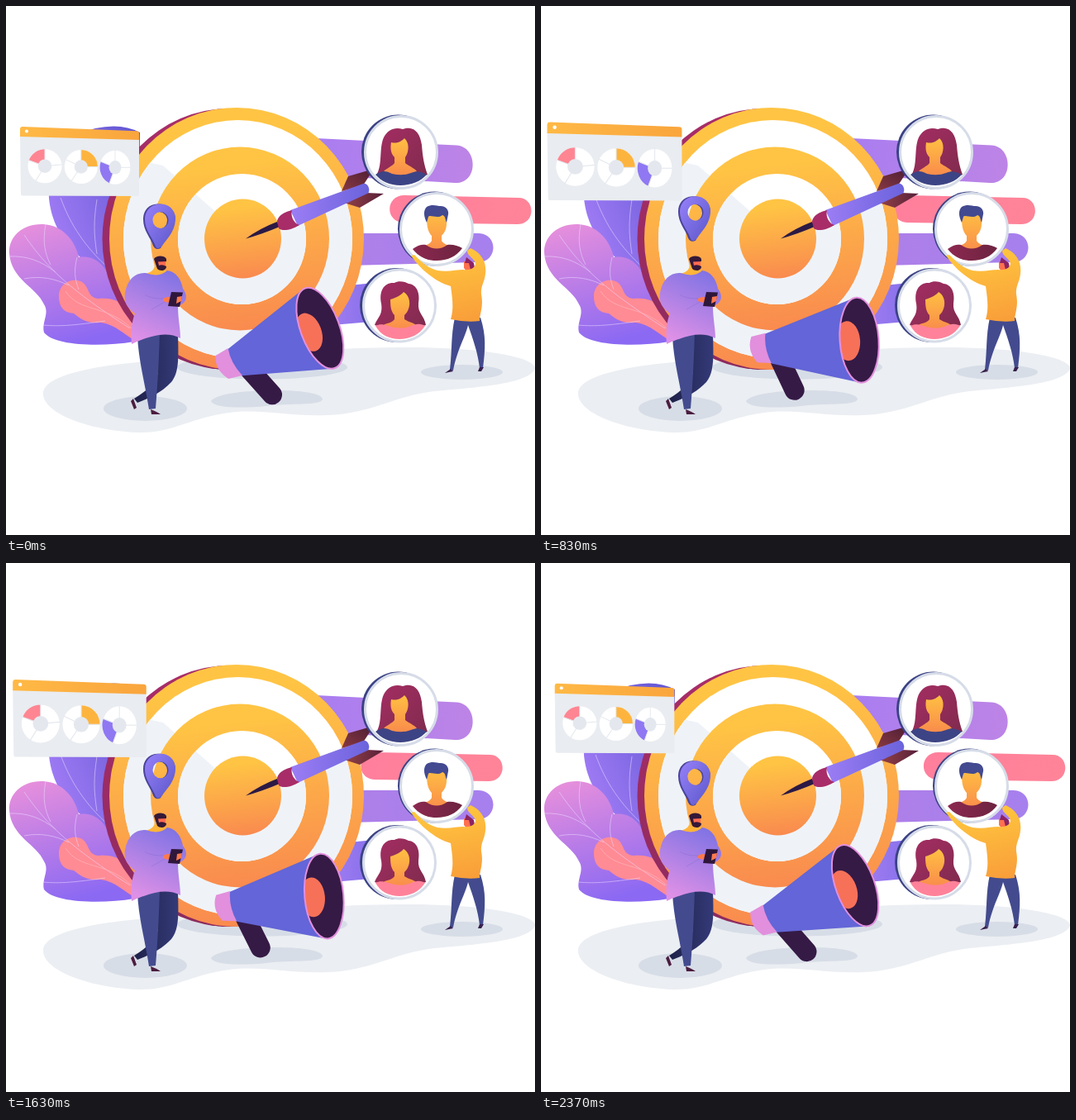
These frames come from a looping animation (640 by 640 pixels, 2.4 s). An HTML page:

```html
<!DOCTYPE html>
<html lang="en">
<head>
<meta charset="utf-8">
<title>Target audience</title>
<style>
  html, body { margin: 0; width: 100%; height: 100%; overflow: hidden; background: #fff; }
  svg { display: block; width: 100%; height: 100%; }
</style>
</head>
<body>
<svg viewBox="0 0 640 640">
  <defs id="defs"></defs>

  <!-- ground -->
  <path fill="#ebeef2" d="M45 468C47 446 110 433 200 428C300 420 420 412 500 413C580 414 640 425 640 438C636 456 575 461 530 465C470 469 450 492 390 495C340 497 310 487 270 492C225 498 200 517 160 516C100 514 43 492 45 468Z"/>
  <g fill="#d7dde7">
    <ellipse cx="310" cy="437" rx="103" ry="14.5"/>
    <ellipse cx="168.500" cy="487" rx="50.500" ry="15"/>
    <path d="M248 478C254 469 290 465 325 465C355 465 383 468 383 476C380 484 345 480 315 484C285 487 250 486 248 478Z"/>
    <ellipse cx="551.500" cy="443" rx="49.500" ry="9"/>
  </g>

  <!-- leaves -->
  <path fill="url(#leafBack)" d="M162 153Q140 141 108 148C66 160 50 195 52 233C55 262 68 285 92 306L125 385H160Z"/>
  <path fill="url(#leaf)" d="M4 299C3 279 20 263 45 264C68 265 84 284 88 304C105 301 120 312 124 328C128 342 140 352 155 362V406C115 413 58 411 46 395C43 382 53 372 46 361C37 340 6 331 4 299Z"/>
  <path fill="#ff8b95" d="M64 352C63 338 77 328 90 333C102 338 97 353 112 354C130 352 142 358 158 374V406C145 399 132 385 115 383C98 384 92 380 82 372C70 371 64 364 64 352Z"/>
  <g fill="none" stroke="#eadcff" stroke-width=".9" opacity=".6">
    <path d="M22 277C50 318 80 345 150 390M48 264C44 285 47 300 54 313M4 303C25 302 42 308 60 322M86 304C82 320 83 330 88 343M45 386C65 388 85 386 120 381M22 330C42 326 60 330 76 338"/>
    <path d="M66 232C78 265 96 292 125 318M110 234C106 260 106 275 110 300"/>
    <path stroke="#ffc3c3" d="M72 345C90 372 120 360 152 390"/>
  </g>

  <!-- bars -->
  <path fill="url(#bar1)" d="M375 160L545 168.500C571 170 572 215 543 214L400 206Z"/>
  <path fill="url(#bar2)" d="M415 275L572 275C596 276 595 310 571 310L415 314Z"/>
  <path fill="url(#bar3)" d="M415 338L465 333V380L395 386Z"/>
  <path id="slider" fill="url(#barPink)" d="M482 229L620 232C641 232 641 264 619 264L481 262C458 261 459 229 482 229Z"/>

  <!-- target -->
  <ellipse cx="270" cy="282" rx="153.500" ry="158" fill="url(#rim)"/>
  <ellipse cx="279" cy="281.500" rx="154" ry="158.500" fill="url(#gold)"/>
  <g id="rings"></g>
  <ellipse cx="286.500" cy="281.500" rx="46.500" ry="48" fill="url(#gold)"/>

  <!-- dart -->
  <path fill="url(#finTop)" d="M406 224L414 206L445 197L432 217Z"/>
  <path fill="url(#finLow)" d="M409 238L436 226L457 227L428 244Z"/>
  <path fill="#2c1a45" d="M290 281.500Q307 269 328 261L331 267Q310 276 290 281.500Z"/>
  <path fill="url(#shaft)" d="M344 247L432 215C438 213 442 224 437 227L353 266Z"/>
  <path fill="#a82c68" d="M328 261C328 255 336 249 346 247C344 254 348 263 355 265C346 271 334 273 330 269Z"/>

  <!-- portraits -->
  <g id="discs"></g>
  <g clip-path="url(#clip0)">
    <path fill="url(#hair)" d="M448 205C456 192 451 172 457 159C462 149 471 146 480 149C494 144 501 154 503 168C504 182 506 193 510 204Q480 214 448 205Z"/>
    <path fill="url(#skin)" d="M466 165C474 167 479 163 482 160C489 166 487 178 483 183V190C488 194 494 196 497 200L490 206H464L457 200C461 196 467 194 470 190V183C465 178 465 171 466 165Z"/>
    <path fill="#3d4485" d="M447 204C456 198 460 200 467 203Q480 206 490 202C499 198 504 202 509 204C502 212 490 217 477 217S454 212 447 204Z"/>
  </g>
  <g clip-path="url(#clip1)">
    <path fill="url(#skin)" d="M509 256C509 246 534 246 533 258C534 270 530 275 527 278V284C530 289 537 290 541 291L533 300H508L501 291C505 290 513 289 515 284V278C511 274 509 268 509 256Z"/>
    <path fill="#434a90" d="M509 262C506 256 504 248 509 243C516 239 521 242 526 242C532 242 536 247 535 252L533 262C531 258 532 254 528 253C522 258 513 252 511 255Z"/>
    <path fill="url(#wine)" d="M492 294C498 289 504 288 508 289Q521 298 534 289C540 288 547 290 552 293C545 303 534 308 521 308S499 303 492 294Z"/>
  </g>
  <g clip-path="url(#clip2)">
    <path fill="url(#hair)" d="M446 386C450 376 456 374 454 360C451 345 457 334 470 335C474 332 483 333 487 336C498 337 501 349 499 360C498 372 506 374 508 386Q477 398 446 386Z"/>
    <path fill="url(#skin)" d="M465 355C472 353 478 350 481 346C486 349 489 355 488 362C487 369 484 372 482 374V379C488 383 494 383 497 387L490 393H462L455 387C460 383 467 384 470 379V374C466 370 465 364 465 355Z"/>
    <path fill="#ff829a" d="M447 387C455 383 460 387 470 389Q480 391 488 388C498 383 503 385 507 387C500 398 488 403 476 403S453 398 447 387Z"/>
  </g>

  <!-- dashboard -->
  <g id="panel">
    <path fill="#e9ecf0" d="M17 157L161 161V229Q161 230 159 230L20 229.500Q18 229.500 18 227Z"/>
    <path fill="url(#header)" d="M17 149Q17 146 20 146L158 151.200Q161 151.300 161 154V162L17 158Z"/>
    <circle cx="25" cy="151.500" r="2" fill="#fff"/>
    <g id="donuts"></g>
  </g>

  <!-- location pin -->
  <g id="pin" fill-rule="evenodd">
    <path fill="#4b4499" d="M183 239.500C172 240 166 248 166 258C166 272 175 280 178 290Q181 296 187 293L205 258C205 246 195 239 183 239.500ZM185 249A10 10.500 0 0 1 185 270A10 10.500 0 0 1 185 249Z"/>
    <path fill="url(#pinFill)" d="M186 239.500C175 240 168 248 168 258C168 272 178 281 181 291Q184 296 189 290C194 282 204 274 205 259C205.500 247 197 239 186 239.500ZM187 249A9.500 10 0 0 1 187 269A9.500 10 0 0 1 187 249Z"/>
  </g>

  <!-- man with phone -->
  <path fill="url(#legBack)" d="M182 395L208 398C209 428 209 444 200 455C188 468 172 475 159 480L155 475C168 467 177 460 184 444Z"/>
  <path fill="#434b8e" d="M159 398L186 395C185 425 184 452 181 487L173 488C168 455 160 428 159 398Z"/>
  <path fill="#4b1c3f" d="M175 488Q183 491 187 494H176ZM154 475L158 486L155 488L151 478Z"/>
  <path fill="#ffb43a" d="M180 313H192L194 323Q184 331 169 324Q180 321 180 313Z"/>
  <path fill="url(#sweater)" d="M169 323Q186 329 195 320C205 321 212 330 214 342C220 350 220 359 208 363C208 378 211 390 211 402C196 394 178 397 152 409C151 393 152 382 156 372C147 366 142 358 144 347C147 330 157 322 169 323Z"/>
  <path fill="none" stroke="#7566c6" stroke-width=".8" opacity=".4" d="M168 349C175 354 184 354 192 354M176 367L192 358"/>
  <path fill="#ff6b52" d="M183 305H193V316H183Z"/>
  <path fill="#351938" d="M179 306C181 302 191 301 194 306V309L184 309.500L185 314Q189 312 194 315C194 321 186 321 183 318Q181 312 179 306Z"/>
  <path fill="#ff7a4c" d="M190 354Q197 350 201 354L200 359Q194 359 190 357Z"/>
  <path fill="#2f173c" d="M200 346L214 346.500L210 364L196 363Z"/>
  <path fill="#ff7a4c" d="M207 352L213 351L212 357L206 360Z"/>

  <!-- man lifting a portrait -->
  <path fill="#434b8e" d="M543 377H574C581 398 580 415 577 438L573 438C571 420 565 403 559 386C556 400 546 415 541 441L537 440C540 415 538 400 543 377Z"/>
  <path fill="#38204d" d="M538 439L541 442L531 444ZM573 437H578L575 442L571 442Z"/>
  <path fill="#ff704f" d="M554 309H563L565 322H558L554 317Z"/>
  <path fill="#8c2463" d="M555 311L557 304L566 311L567 317L562 319L560 311Z"/>
  <path fill="url(#jumper)" d="M490 302L494 301C503 310 510 317 522 320C535 322 545 319 553 319C562 320 567 317 568 312C567 305 558 303 558 296L562 293C574 298 582 309 580 324C579 334 574 339 575 349C578 364 573 372 573 381Q557 383 538 379C542 366 540 354 538 339C522 335 502 320 490 302Z"/>

  <!-- megaphone -->
  <g id="horn">
    <path stroke="#351a45" stroke-width="24" stroke-linecap="round" d="M286 416L300.500 461"/>
    <path fill="#6365d8" d="M273 389L389 359L383 463L276 425Q269 406 273 389Z"/>
    <path fill="#e28fdd" d="M257 390L274.500 388Q270 406 277 425L260 422Q249 406 257 390Z"/>
    <g transform="rotate(3.500 386 411)">
      <ellipse cx="386" cy="411" rx="23.500" ry="51.500" fill="#351a45"/>
      <ellipse cx="372" cy="411" rx="15" ry="24" fill="#f77159" clip-path="url(#clipHorn)"/>
      <ellipse cx="386" cy="411" rx="23.500" ry="51.500" fill="none" stroke="#e28fdd" stroke-width="2"/>
    </g>
  </g>
</svg>
<script>
const $ = id => document.getElementById(id);

// id: [x1, y1, x2, y2, first colour, last colour]
const gradients = {
  leafBack: [1, 0, .2, .7, '#5e54d0', '#9f7bf5'],
  leaf: [.2, 0, .5, 1, '#e68fdc', '#8b69f3'],
  bar1: [0, 0, 1, 0, '#a97df0', '#bd84e6'],
  bar2: [0, 0, 1, 0, '#ae7fe8', '#a680ee'],
  bar3: [0, 0, 1, 0, '#a07cf0', '#7b6bea'],
  barPink: [0, 0, 1, 0, '#ff7f9c', '#ff8498'],
  rim: [0, 0, 0, 1, '#a92d69', '#8c2a5e'],
  gold: [.45, .1, .55, 1, '#ffc444', '#f98a4f'],
  finTop: [0, 1, 1, 0, '#8a3a41', '#4b1c35'],
  finLow: [0, 0, 1, 0, '#934146', '#571f39'],
  shaft: [0, 0, 1, 0, '#9c7df5', '#6b63dc'],
  hair: [0, 0, 1, 1, '#a52d63', '#7f2b4d'],
  skin: [0, 0, 0, 1, '#ffc042', '#f98a4c'],
  wine: [0, 0, 1, 0, '#8c2850', '#6d2440'],
  header: [0, 0, 1, 0, '#ffb945', '#f9a53d'],
  pinFill: [0, 0, 1, 1, '#9781fa', '#5b57c9'],
  legBack: [0, 0, 1, 0, '#1e2149', '#343a78'],
  sweater: [.8, 0, .4, 1, '#7d72e4', '#de90e6'],
  jumper: [.4, 0, .6, 1, '#ffc83e', '#f99f3a'],
};
const discs = [[478, 177, 3.5], [521, 270, 2.5], [476, 362.5, 3.5]];
const ellipse = (x, y, rx, ry, attrs) =>
  `<ellipse cx="${x}" cy="${y}" rx="${rx}" ry="${ry}" ${attrs}/>`;
const clip = (id, shape) => `<clipPath id="${id}">${shape}</clipPath>`;

$('defs').innerHTML =
  Object.entries(gradients).map(([id, [x1, y1, x2, y2, a, b]]) =>
    `<linearGradient id="${id}" x1="${x1}" y1="${y1}" x2="${x2}" y2="${y2}">
      <stop stop-color="${a}"/><stop offset="1" stop-color="${b}"/></linearGradient>`).join('') +
  discs.map(([x, y], i) => clip('clip' + i, ellipse(x, y, 42, 42, ''))).join('') +
  clip('clipHorn', ellipse(386, 411, 23.5, 51.5, '')) +
  clip('clipOuter', ellipse(280.5, 282, 138.5, 144, '')) +
  clip('clipInner', ellipse(285.5, 282, 77.5, 79, ''));

const whiteRing = (x, y, rx, ry, id) => ellipse(x, y, rx, ry, 'fill="#fff"') +
  `<path clip-path="url(#${id})" fill="#eff3f8" d="M130 180L190 193L290 281L440 225V440H130Z"/>`;
$('rings').innerHTML = whiteRing(280.5, 282, 138.5, 144, 'clipOuter') +
  ellipse(283, 281.5, 108, 111, 'fill="url(#gold)"') +
  whiteRing(285.5, 282, 77.5, 79, 'clipInner');

$('discs').innerHTML = discs.map(([x, y, depth]) =>
  ellipse(x - depth, y - .5, 44.5, 45, 'fill="#3b4285"') +
  ellipse(x, y, 43.5, 43.5, 'fill="#fff" stroke="#d6dce8" stroke-width="3"')).join('');

const donut = (x, y, squeeze, color, from, span, spokes) =>
  `<g transform="translate(${x} ${y}) scale(${squeeze} 1)">
    <circle r="20.5" fill="#fff"/>
    <circle r="14" fill="none" stroke="${color}" stroke-width="13" pathLength="360"
      stroke-dasharray="${span} 360" transform="rotate(${from})"/>
    ${spokes.map(a => `<path stroke="#e4e8ee" d="M0 0H21" transform="rotate(${a})"/>`).join('')}
    <circle r="8.3" fill="#e4e8ee"/></g>`;
$('donuts').innerHTML =
  donut(47, 193.7, 1, '#ff8592', 200, 70, [-90, -5, 122, 200]) +
  donut(90.8, 194.5, .98, '#fdb43f', -90, 90, [-90, 0, 125, 205]) +
  donut(132, 195.3, .9, '#8f78f2', 112, 88, [-90, 0, 112, 200]);

function draw(now) {
  const p = 1 - Math.abs(1 - now % 2400 / 1200);
  const move = (id, value) => $(id).setAttribute('transform', value);
  move('panel', `translate(89.300 188) scale(${1 + .19 * p}) translate(-89.300 -188)`);
  move('slider', `translate(${-54.5 * p} 0)`);
  move('pin', `translate(0 ${-13.5 * p})`);
  move('horn', `rotate(${24 * (p - 1)} 333 415)`);
  requestAnimationFrame(() => draw(performance.now()));
}
draw(performance.now());
</script>
</body>
</html>
```
